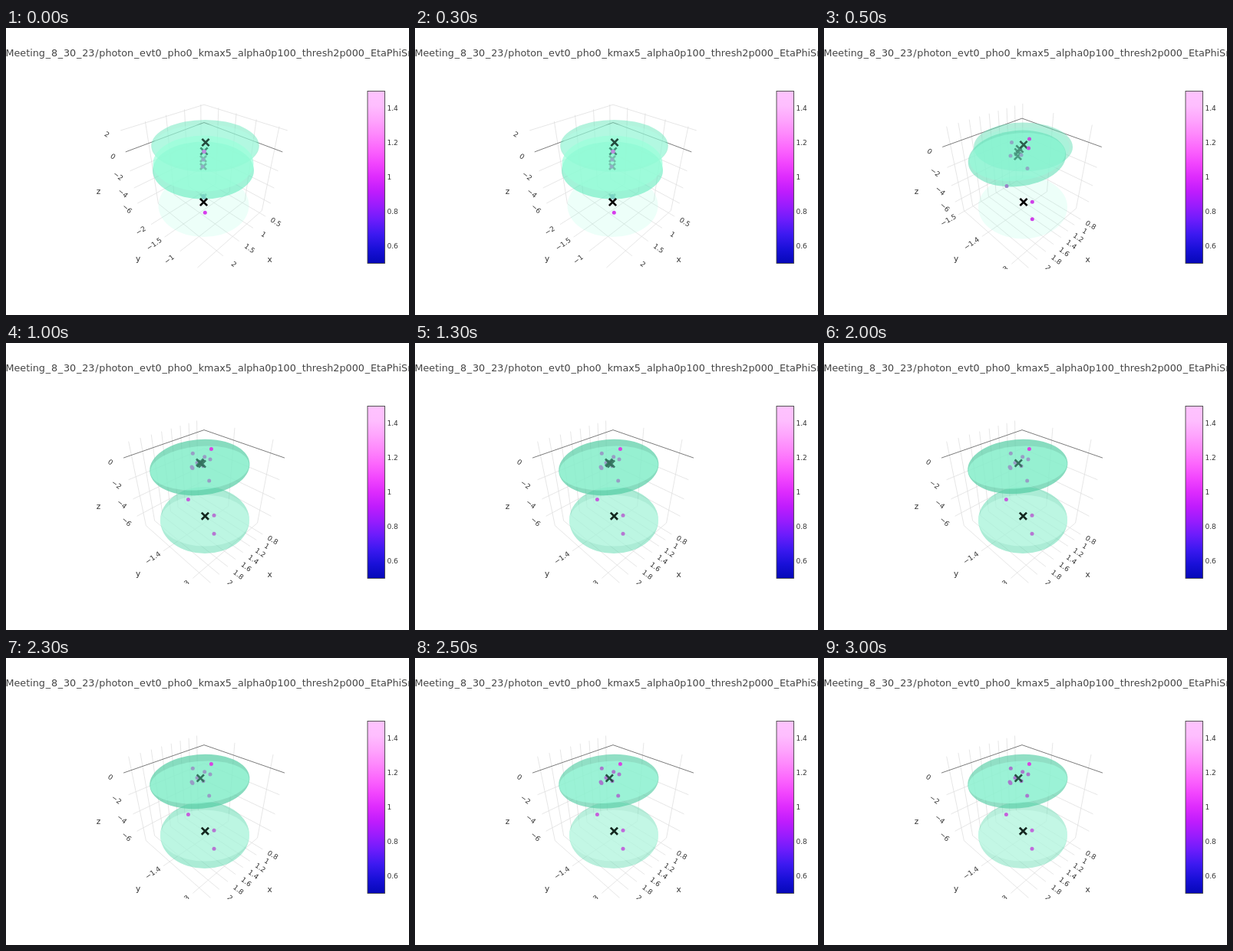
An HTML page with a canvas for the animation above (3500 ms loop, 525 by 375 pixels).

```html
<!DOCTYPE html>
<html lang="en">
<head>
<meta charset="utf-8">
<title>Event clusters</title>
<style>
html, body { margin: 0; width: 100%; height: 100%; overflow: hidden; background: #fff; }
canvas { display: block; }
</style>
</head>
<body>
<canvas id="stage" width="525" height="375"></canvas>
<script>
const ctx = document.getElementById('stage').getContext('2d');
const FONT = '"DejaVu Sans", sans-serif';
const INK = '#444';
const TICK_INK = '#333';
const GRID = '#dcdcdc';
const STEP = 500;
const SCALE = ['#0508b8', '#1910d8', '#3c19f0', '#6b1cfb', '#981cfd', '#bf1cfd', '#dd2bfd',
  '#f246fe', '#fc67fd', '#fe88fc', '#fea5fd', '#febefe', '#fec3fe'];

// Perspective view of a unit cube from (1.25, 1.25, 1.25)
function project(x, y, z) {
  const k = 289.7 / (2.165 - (x + y + z) / Math.sqrt(3));
  return [258 + k * (y - x) / Math.SQRT2, 195 - k * (2 * z - x - y) / Math.sqrt(6)];
}

function path(color, ...points) {
  ctx.strokeStyle = color;
  ctx.lineWidth = 0.7;
  ctx.beginPath();
  points.forEach(p => ctx.lineTo(...project(...p)));
  ctx.stroke();
}

function write(str, x, y, size, align = 'center', color = INK) {
  ctx.font = size + 'px ' + FONT;
  ctx.textAlign = align;
  ctx.textBaseline = 'middle';
  ctx.fillStyle = color;
  ctx.fillText(str, x, y);
}

// Label pushed outward from the axis, its baseline parallel to a cube direction
function tickLabel(value, at, out, along = out) {
  const shift = (dir, k) => project(...at.map((c, i) => c + dir[i] * k));
  const [ax, ay] = at.length && project(...at);
  const [bx, by] = shift(along, 0.125);
  let angle = Math.atan2(by - ay, bx - ax);
  if (Math.cos(angle) < 0) angle += Math.PI;
  ctx.save();
  ctx.translate(...shift(out, 0.122));
  ctx.rotate(angle);
  write(String(value).replace('-', '\u2212'), 0, 0.3, 9, 'center', TICK_INK);
  ctx.restore();
}

// Each axis: first tick, tick step, tick count, cube position of the first tick, cube step
function ticks([first, step, count, pos, gap], fn) {
  for (let i = 0; i < count; i++) fn(+(first + i * step).toFixed(1), pos + i * gap);
}

function drawAxes({ x, y, z }) {
  const h = 0.5;
  ticks(x, (v, p) => {
    path(GRID, [p, h, -h], [p, -h, -h], [p, -h, h]);
    tickLabel(v, [p, h, -h], [0, 1, 0]);
  });
  ticks(y, (v, p) => {
    path(GRID, [h, p, -h], [-h, p, -h], [-h, p, h]);
    tickLabel(v, [h, p, -h], [1, 0, 0]);
  });
  ticks(z, (v, p) => {
    path(v === 0 ? INK : GRID, [h, -h, p], [-h, -h, p], [-h, h, p]);
    tickLabel(v, [h, -h, p], [1, 0, 0], [0, 1, 0]);
  });
}

function oval(cx, cy, rx, ry, deg, color) {
  ctx.fillStyle = color;
  ctx.beginPath();
  ctx.ellipse(cx, cy, rx, ry, deg * Math.PI / 180, 0, 2 * Math.PI);
  ctx.fill();
}

function dots(color, points, r = 2.5) {
  points.forEach(([x, y]) => oval(x, y, r, r, 0, color));
}

function cross(x, y, color, r = 4.6) {
  ctx.strokeStyle = color;
  ctx.lineWidth = 2.7;
  ctx.beginPath();
  ctx.moveTo(x - r, y - r);
  ctx.lineTo(x + r, y + r);
  ctx.moveTo(x + r, y - r);
  ctx.lineTo(x - r, y + r);
  ctx.stroke();
}

const wideAxes = {
  x: [0.5, 0.5, 4, -0.45, 0.235],
  y: [-2, 0.5, 4, -0.285, 0.235],
  z: [-6, 2, 5, -0.34, 0.2067]
};
const midAxes = {
  x: [0.8, 0.2, 8, -0.39, 0.116],
  y: [-1.5, 0.1, 3, -0.49, 0.43],
  z: [-6, 2, 4, -0.32, 0.2167]
};
const tightAxes = {
  x: [0.8, 0.2, 8, -0.39, 0.116],
  y: [-1.4, 0.1, 2, -0.07, 0.43],
  z: [-6, 2, 4, -0.31, 0.2267]
};

function sceneWide() {
  drawAxes(wideAxes);
  oval(257.5, 232, 59, 41, 0, 'rgba(127,255,212,.14)');
  cross(257, 221, '#a3c4c0', 4);
  dots('#9fb0d0', [[257, 219.5], [258, 221.5]]);
  oval(259.5, 154, 70.3, 34, 0, 'rgba(110,232,190,.52)');
  oval(259.5, 155.5, 68.5, 29.5, 0, 'rgba(175,255,230,.4)');
  oval(257, 186, 66, 37.5, 0, 'rgba(100,235,190,.6)');
  oval(257, 177, 65.5, 36.5, 0, 'rgba(155,255,220,.72)');
  cross(257, 181, '#72bfa9', 4);
  cross(257, 171, '#72bfa9', 4);
  cross(258, 161, '#3d9276');
  cross(260, 149.5, '#23493c');
  dots('#8fb0c4', [[257, 172], [256, 181]]);
  dots('#b98fdc', [[258, 161.5]], 2.8);
  cross(257.5, 227.5, '#000');
  dots('#d63cec', [[259.3, 241.3]]);
}

function sceneMid() {
  drawAxes(midAxes);
  oval(259, 234, 58, 41.5, 0, 'rgba(127,255,212,.14)');
  oval(259.5, 155.5, 64.5, 32, 0, 'rgba(108,222,184,.52)');
  oval(258, 157, 62, 27, -2, 'rgba(155,248,218,.35)');
  oval(251.5, 170.5, 64, 36.5, -6, 'rgba(100,224,184,.6)');
  oval(252, 168.5, 62.5, 31, -6, 'rgba(148,252,218,.6)');
  cross(252.5, 167.5, '#4b9c82');
  cross(253, 162, '#4b9c82');
  cross(255, 158, '#478f78');
  cross(260, 152.5, '#2b5d4c');
  dots('#8fa9c4', [[244.5, 149.5], [243, 167], [257, 166], [265, 183.5]]);
  dots('#9a86c8', [[238, 206.5]]);
  dots('#c252d8', [[267.5, 145], [266.5, 157]]);
  cross(260, 227.5, '#000');
  dots('#cf3fe8', [[271.3, 227.3], [271.3, 249.8]]);
}

function sceneTight({ low, clear, merged }) {
  drawAxes(tightAxes);
  oval(259, 231.5, 58, 43.5, 0, `rgba(102,220,180,${clear ? 0.46 : 0.54})`);
  oval(259, 232, 58, 33.5, 0, `rgba(205,255,238,${clear ? 0.52 : 0.48})`);
  const ry = (low - 126) / 2;
  oval(252.3, 126 + ry, 65.3, ry, -5, `rgba(84,206,164,${clear ? 0.64 : 0.7})`);
  oval(252.3, 127 + ry, 64.5, ry - 8, -5, `rgba(162,255,224,${clear ? 0.62 : 0.57})`);

  const inner = clear ? '#a879cd' : '#989dc5';
  dots(inner, [[243.3, 144.3], [258.7, 148.8], [266, 152], [242, 162],
    [257, 160.8], [243, 163.5], [249, 156.5], [264.7, 180]]);
  dots('#d845e0', [[267.4, 138.4]]);
  dots('#c65fdc', [[237.4, 204.4]]);
  dots(clear ? '#c06adb' : '#b676d2', [[271, 225.3], [271, 249.3]]);

  if (!merged) {
    cross(252.5, 156, '#3f8972');
    cross(255.5, 158, '#3a7d68');
  }
  cross(253.3, 157, clear ? '#234f41' : '#34715d');
  cross(259.4, 226.2, '#142820');
}

const settled = { low: 197, merged: true };
const cleared = { low: 196.5, merged: true, clear: true };
const scenes = [
  sceneWide,
  sceneMid,
  () => sceneTight({ low: 199 }),
  () => sceneTight(settled),
  () => sceneTight(settled),
  () => sceneTight(cleared),
  () => sceneTight(cleared)
];

function drawTitle() {
  const name = 'Meeting_8_30_23/photon_evt0_pho0_kmax5_alpha0p100_thresh2p000_EtaPhiSmear';
  let x = -0.5;
  for (const part of name.split(/([_\/])/)) {
    const pad = /[_\/]/.test(part) ? 0.8 : 0;
    write(part, x + pad, 33.8, 12.75, 'left');
    x += ctx.measureText(part).width + 2 * pad;
  }
}

function drawColorBar() {
  const fill = ctx.createLinearGradient(0, 307.5, 0, 82.5);
  SCALE.forEach((c, i) => fill.addColorStop(i / (SCALE.length - 1), c));
  ctx.fillStyle = fill;
  ctx.fillRect(471, 82.5, 22.5, 225);
  ctx.strokeStyle = INK;
  ctx.lineWidth = 0.9;
  ctx.strokeRect(471, 82.5, 22.5, 225);
  for (let i = 0; i < 5; i++) {
    write(String(+(1.4 - i * 0.2).toFixed(1)), 496.5, 105.6 + i * 45, 9, 'left', TICK_INK);
  }
}

function draw(i) {
  ctx.fillStyle = '#fff';
  ctx.fillRect(0, 0, 525, 375);
  drawTitle();
  drawColorBar();
  ctx.save();
  ctx.beginPath();
  ctx.rect(60, 75, 396, 240);
  ctx.clip();
  scenes[i]();
  write('z', 120.5, 214, 10.5, 'center', TICK_INK);
  write('y', 172, 302, 10.5, 'center', TICK_INK);
  write('x', 343.5, 303.5, 10.5, 'center', TICK_INK);
  ctx.restore();
}

let shown = -1;
const start = performance.now();
function tick() {
  const i = Math.floor((performance.now() - start) / STEP) % scenes.length;
  if (i !== shown) draw(shown = i);
  requestAnimationFrame(tick);
}
tick();
</script>
</body>
</html>
```
